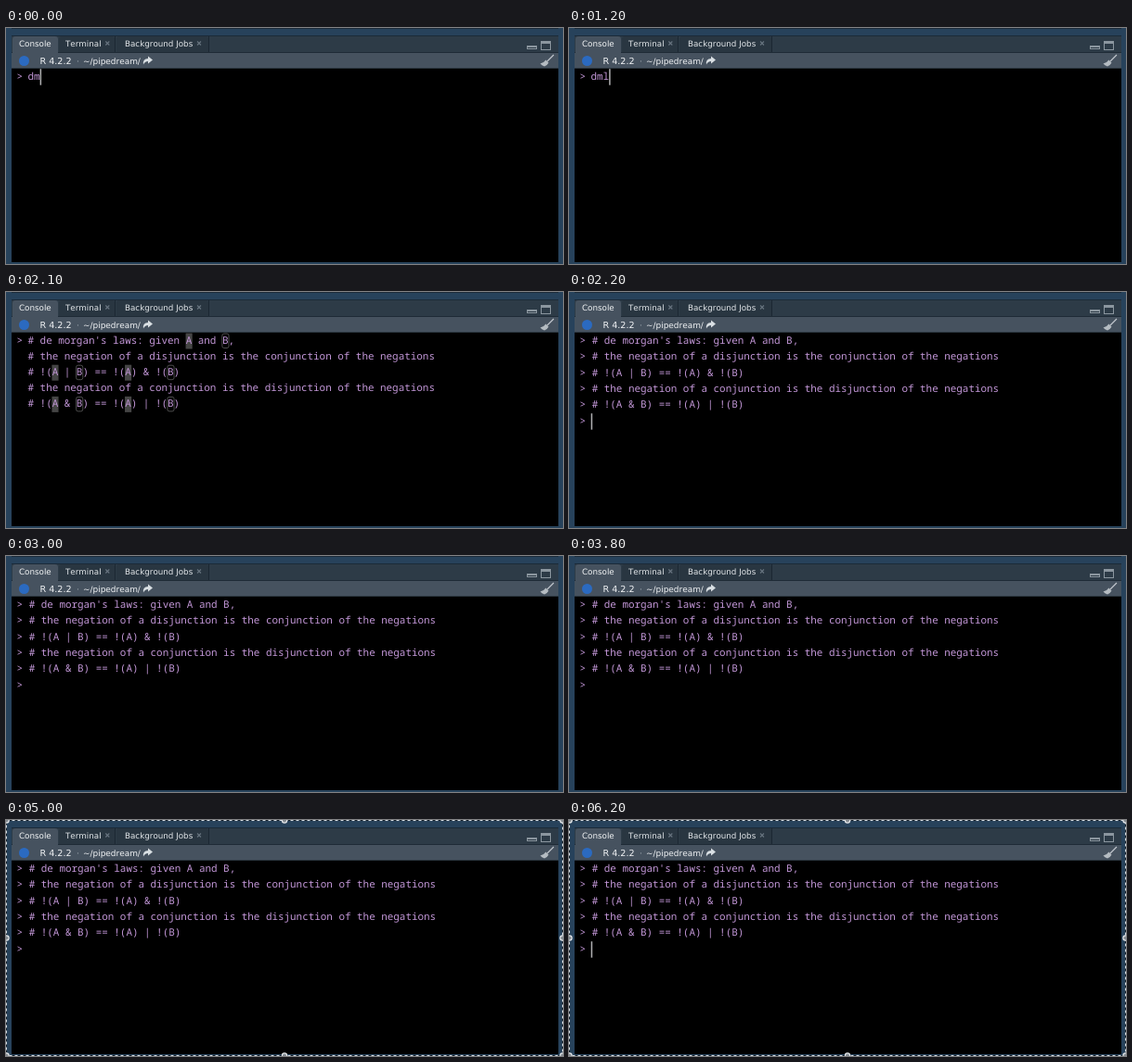
These frames come from a looping animation (600 px wide and 255 px high, 6.8 s). An HTML page with a canvas:

```html
<!DOCTYPE html>
<html lang="en">
<head>
<meta charset="utf-8">
<title>Console snippet</title>
<style>
  html, body { margin: 0; width: 100%; height: 100%; overflow: hidden; background: #27425b; }
  canvas { display: block; width: 600px; height: 255px; }
</style>
</head>
<body>
<canvas id="stage"></canvas>
<script>
const W = 600, H = 255, LOOP = 6800;
const canvas = document.getElementById('stage');
const scale = window.devicePixelRatio || 1;
canvas.width = W * scale;
canvas.height = H * scale;
const ctx = canvas.getContext('2d');
ctx.scale(scale, scale);

const UI = '"DejaVu Sans", sans-serif';
const MONO = '10.92px "Noto Sans Mono", monospace';
const INK = '#c397d8', CARET = '#b0b0b2';
const ADV = 6.552;      // width of one console character
const INPUT_X = 23.5;   // where typed input starts
const BASE = 56;        // first console baseline

const LINES = [
  "# de morgan's laws: given A and B,",
  '# the negation of a disjunction is the conjunction of the negations',
  '# !(A | B) == !(A) & !(B)',
  '# the negation of a conjunction is the disjunction of the negations',
  '# !(A & B) == !(A) | !(B)'
];

function rect(x, y, w, h, color) {
  ctx.fillStyle = color;
  ctx.fillRect(x, y, w, h);
}

function text(str, x, y, font, color) {
  ctx.font = font;
  ctx.fillStyle = color;
  ctx.fillText(str, x, y);
}

function path(color, width, points) {
  ctx.strokeStyle = color;
  ctx.lineWidth = width;
  ctx.beginPath();
  points.forEach(([x, y]) => ctx.lineTo(x, y));
  ctx.stroke();
}

function disc(x, y, r, color) {
  ctx.fillStyle = color;
  ctx.beginPath();
  ctx.arc(x, y, r, 0, Math.PI * 2);
  ctx.fill();
}

function tab(x, w, label, labelX, closeX) {
  const active = !closeX;
  ctx.fillStyle = active ? '#46525f' : '#293641';
  ctx.beginPath();
  ctx.roundRect(x, 9, w, active ? 18 : 17, [3, 3, 0, 0]);
  ctx.fill();
  text(label, labelX, 20, '8.75px ' + UI, active ? '#f2f4f5' : '#e2e6e9');
  if (active) return;
  path('#687580', 1.1, [[closeX - 2, 14.5], [closeX + 2, 18.5]]);
  path('#687580', 1.1, [[closeX + 2, 14.5], [closeX - 2, 18.5]]);
  rect(x + w, 9, 1, 17, '#1b2732');
}

function shareArrow() {
  ctx.fillStyle = '#d9dfe3';
  ctx.beginPath();
  ctx.moveTo(148, 39.5);
  ctx.quadraticCurveTo(147, 33, 153, 33);
  ctx.lineTo(153, 30.5);
  ctx.lineTo(158, 34.5);
  ctx.lineTo(153, 38.5);
  ctx.lineTo(153, 36);
  ctx.quadraticCurveTo(149.5, 36, 148, 39.5);
  ctx.fill();
}

function broom() {
  path('#c5cbd0', 1.1, [[590, 29], [583, 36]]);
  ctx.fillStyle = '#b5bcc2';
  ctx.beginPath();
  ctx.moveTo(581.5, 34.5);
  ctx.lineTo(584.5, 37.5);
  ctx.quadraticCurveTo(583, 40.5, 580, 41.5);
  ctx.quadraticCurveTo(577, 40.5, 575.5, 38.5);
  ctx.quadraticCurveTo(579.5, 37.5, 581.5, 34.5);
  ctx.fill();
}

function frame() {
  rect(0, 0, W, H, '#27425b');
  rect(6, 0, 589, 1, '#1b2a38');
  rect(6, 8, 589, 1, '#1b2a38');
  rect(6, 9, 589, 17, '#2d3b47');
  rect(6, 26, 589, 1, '#1f2b36');
  rect(6, 27, 589, 16, '#46525f');
  rect(6, 43, 589, 1, '#2a343d');
  tab(7, 49, 'Console', 14);
  tab(57, 60, 'Terminal', 64, 109.3);
  tab(119, 99, 'Background Jobs', 128, 208);

  // minimize and maximize
  ctx.strokeStyle = '#8b969f';
  ctx.lineWidth = 1;
  ctx.strokeRect(561.5, 19.5, 10, 3);
  ctx.strokeRect(576.5, 14.5, 10, 9);
  rect(561, 19, 11, 2, '#8b969f');
  rect(576, 14, 11, 3, '#8b969f');

  disc(19.5, 35.5, 5.5, '#2b6ac0');
  text('R 4.2.2', 36.5, 39, '9.6px ' + UI, '#f0f2f4');
  text('·', 76, 39, '8.8px ' + UI, '#aab3ba');
  text('~/pipedream/', 83, 39, '8.95px ' + UI, '#f0f2f4');
  shareArrow();
  broom();
  rect(6, 44, 589, 209, '#000');
}

const mono = (str, x, y) => text(str, x, y, MONO, INK);

function caret(x, y) {
  rect(x, y, 1.5, 17.5, CARET);
}

function typing(t) {
  const word = t < 200 ? 'dm' : 'dml';
  mono('>', 11.5, BASE);
  mono(word, INPUT_X, BASE);
  if (t < 800 || t >= 1200) caret(INPUT_X + word.length * ADV, 44.2);
}

// Expanded snippet: A is the selected field, B the next one.
function snippet(t) {
  mono('>', 11.5, BASE);
  LINES.forEach((line, row) => {
    const y = BASE + row * 17.1;
    for (const { 0: name, index } of line.matchAll(/[AB]/g)) {
      const x = INPUT_X + index * ADV;
      if (name === 'A') {
        rect(x - 0.3, y - 11.5, ADV + 0.6, 17, '#454545');
        if (t < 1900) caret(x + ADV, y - 11.5);
      } else {
        ctx.strokeStyle = '#565656';
        ctx.lineWidth = 0.9;
        ctx.beginPath();
        ctx.roundRect(x - 0.3, y - 11, ADV + 0.6, 15.5, 2);
        ctx.stroke();
      }
    }
    mono(line, INPUT_X, y);
  });
}

function executed(t) {
  const pitch = 17.35;
  LINES.forEach((line, row) => mono('> ' + line, 11.6, BASE + row * pitch));
  mono('>', 11.5, BASE + 5 * pitch);
  if ((t - 2200) % 1000 < 600) caret(INPUT_X + 0.2, 131.2);
}

function selection() {
  ctx.lineWidth = 1;
  ctx.strokeStyle = '#15202a';
  ctx.strokeRect(0.5, 0.5, W - 1, H - 1);
  ctx.strokeStyle = '#d5dce2';
  ctx.setLineDash([3, 3]);
  ctx.strokeRect(0.5, 0.5, W - 1, H - 1);
  ctx.setLineDash([]);
  for (const x of [0.5, 300, 599.5]) {
    for (const y of [0.5, 127.5, 254.5]) {
      if (x === 300 && y === 127.5) continue;
      disc(x, y, 3.2, '#e4e7ea');
      disc(x, y, 2, '#858c92');
    }
  }
}

function draw(t) {
  frame();
  if (t < 1300) typing(t);
  else if (t < 2200) snippet(t);
  else executed(t);
  if (t >= 4900) selection();
}

ctx.textRendering = 'geometricPrecision';
ctx.fontKerning = 'none';
const start = performance.now();
function tick() {
  draw((performance.now() - start) % LOOP);
  requestAnimationFrame(tick);
}
tick();
</script>
</body>
</html>
```
